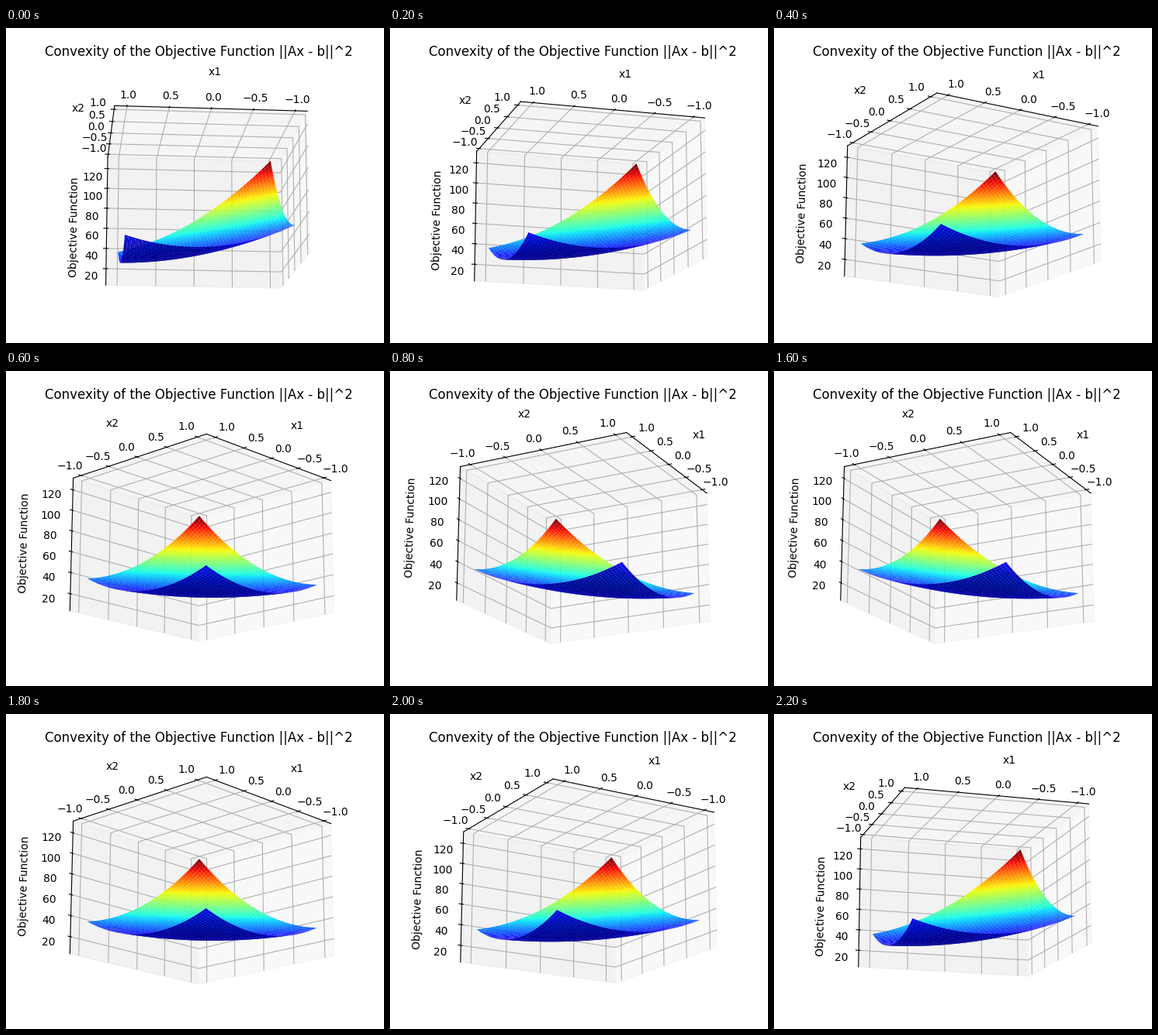
Animation of 487 by 407 pixels, one loop 2400 ms. Source, as a matplotlib script:

```python
import numpy as np
import matplotlib.pyplot as plt
from matplotlib.animation import FuncAnimation

W, H, DPI = 487, 407, 100
SIDE, LEFT, TOP = 369.6, 63.2, 44.6

# Camera path (elevation, azimuth), played forward and then back.
VIEWS = [(-13.8, 84.6), (-13.5, 73.15), (-16.2, 58.8), (-16.5, 43.3),
         (-18.6, 28.2), (-19.9, 18.0), (-23.5, 7.2)]
LOOP = VIEWS + VIEWS[-2:0:-1]


def objective(x, y):
    return 21 - 26.6 * x - 28.7 * y + 15 * x**2 + 17 * y**2 + 20.7 * x * y


fig = plt.figure(figsize=(W / DPI, H / DPI), dpi=DPI)
ax = fig.add_axes([LEFT / W, 1 - (TOP + SIDE) / H, SIDE / W, SIDE / H],
                  projection="3d")

x1, x2 = np.meshgrid(np.linspace(-1, 1, 50), np.linspace(-1, 1, 50))
z = objective(x1, x2)
ax.plot_surface(x1, x2, z, cmap="jet")

edge = 1.1 * 25 / 24
pad = np.ptp(z) / 48
ax.set_xlim(-edge, edge)
ax.set_ylim(-edge, edge)
ax.set_zlim(z.min() - pad, z.max() + pad)
ax.set_xticks(np.arange(-1, 1.1, 0.5))
ax.set_yticks(np.arange(-1, 1.1, 0.5))
ax.set_zticks(range(20, 121, 20))

ax.set_xlabel("x1")
ax.set_ylabel("x2")
ax.set_zlabel("Objective Function")
ax.set_title("Convexity of the Objective Function ||Ax - b||^2")


def update(i):
    elev, azim = LOOP[i]
    ax.view_init(elev=elev, azim=azim)
    return []


anim = FuncAnimation(fig, update, frames=len(LOOP), interval=200,
                     repeat=True, repeat_delay=0, blit=False)
plt.show()
```
